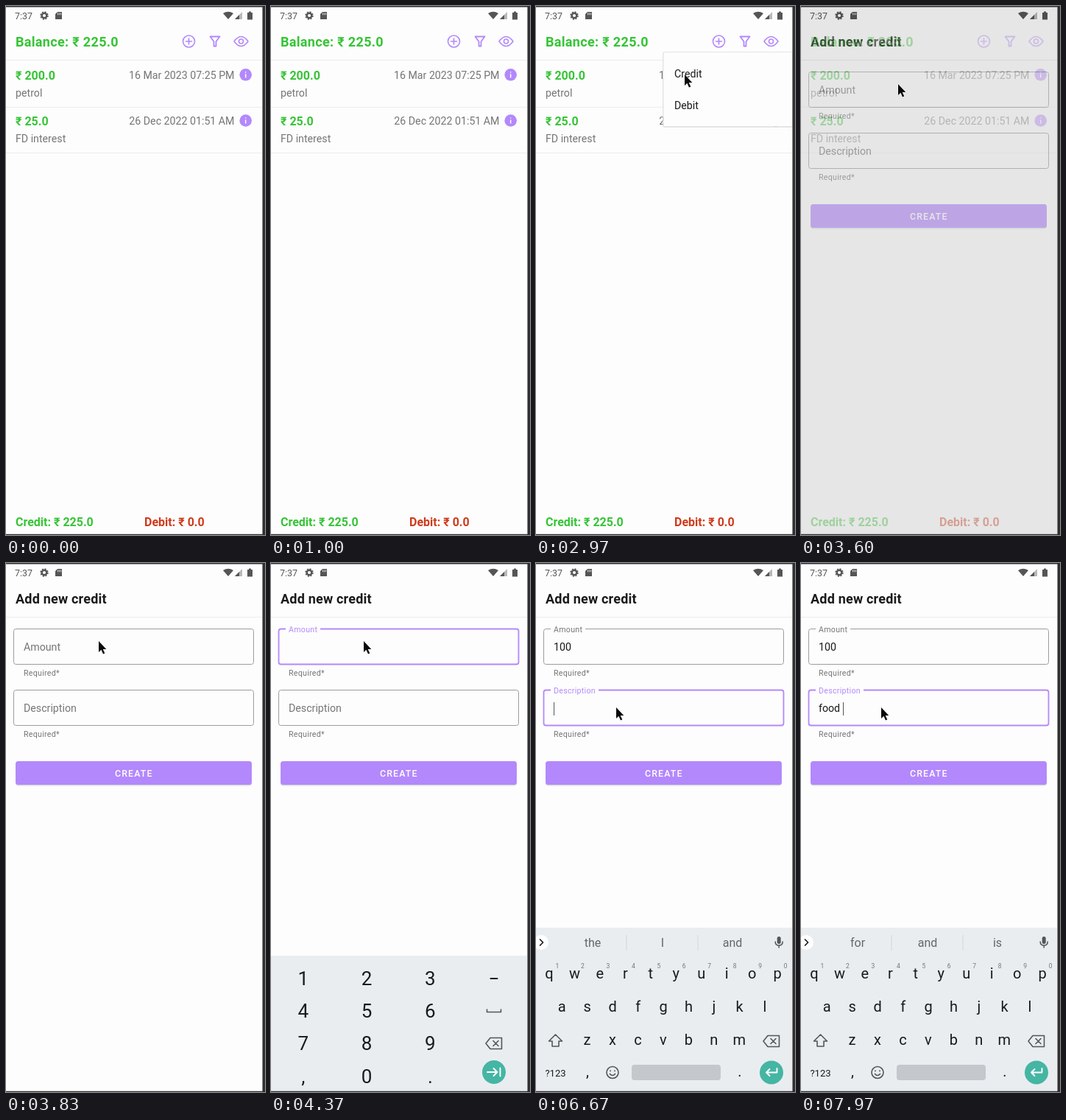
An HTML page for the animation above (8 s loop, 352 by 718 pixels).

```html
<!DOCTYPE html>
<html lang="en">
<head>
<meta charset="utf-8">
<title>Expense tracker</title>
<style>
  html, body { margin: 0; width: 100%; height: 100%; overflow: hidden; background: #fdfdfd; }
  svg { display: block; width: 352px; height: 718px; font-family: Roboto, "Noto Sans", sans-serif; }
  text { white-space: pre; }
  .line { fill: none; stroke-linecap: round; stroke-linejoin: round; }
  #tint { mix-blend-mode: multiply; }
</style>
</head>
<body>
<svg id="stage" viewBox="0 0 352 718"></svg>
<script>
const LOOP = 8000;
const PAPER = '#fdfdfd', PURPLE = '#b388fc', GREEN = '#36c436', RED = '#d03a1c',
  GREY = '#757575', INK = '#1a1a1a', KEYS = '#e9edf0', TEAL = '#45b5a4',
  ICON = '#555', FRAME = '#303030';

const text = (x, y, size, fill, str, extra = '') =>
  `<text x="${x}" y="${y}" font-size="${size}" fill="${fill}" ${extra}>${str}</text>`;
const bold = (x, y, size, fill, str, extra = '') =>
  text(x, y, size, fill, str, `font-weight="700" ${extra}`);
const mid = (x, y, size, fill, str, extra = '') =>
  text(x, y, size, fill, str, `text-anchor="middle" ${extra}`);
const rect = (x, y, w, h, fill, extra = '') =>
  `<rect x="${x}" y="${y}" width="${w}" height="${h}" fill="${fill}" ${extra}/>`;
const circle = (x, y, r, fill, extra = '') =>
  `<circle cx="${x}" cy="${y}" r="${r}" fill="${fill}" ${extra}/>`;
const line = (d, stroke, width = 1.6) =>
  `<path class="line" d="${d}" stroke="${stroke}" stroke-width="${width}"/>`;
const solid = (d, fill) => `<path d="${d}" fill="${fill}"/>`;
const group = (id, body) => `<g id="${id}">${body}</g>`;
const divider = y => rect(0, y, 348, 1, '#ececec');

const statusBar =
  text(12, 17.5, 12.4, ICON, '7:37') +
  circle(52, 13, 3.3, 'none', `stroke="${ICON}" stroke-width="2.4"`) +
  circle(52, 13, 4.9, 'none', `stroke="${ICON}" stroke-width="1.6" stroke-dasharray="2 1.85"`) +
  solid('M70 8h6v10h-9v-7z', ICON) +
  line('M70.5 9.8v2M72.5 9.8v2M74.5 9.8v2', PAPER, .8) +
  solid('M295 10q7-4.500 14 0l-7 8z', ICON) +
  solid('M311 18l10-10v10z', '#b8b8b8') + solid('M311 18l6-6v6z', ICON) +
  solid('M328 9h2v-1.500h3v1.500h2v9.500h-7z', ICON);

const entry = (y, amount, date, note) =>
  bold(13, y, 16, GREEN, amount) +
  text(310.5, y - .8, 14.2, GREY, date, 'text-anchor="end"') +
  text(13, y + 23, 14.2, GREY, note) +
  circle(325.7, y - 6.5, 8.3, PURPLE) +
  line(`M325.700 ${y - 7}v4M325.700 ${y - 10}v.1`, PAPER, 1.5) +
  divider(y + 37);

const listScreen =
  bold(13, 55.3, 18, GREEN, 'Balance: ₹ 225.0', 'letter-spacing=".32"') +
  circle(248.5, 48, 8, 'none', `stroke="${PURPLE}" stroke-width="1.6"`) +
  line('M244.500 48h8M248.500 44v8', PURPLE) +
  line('M277.500 41.500h13l-5 6.700v6.300h-3v-6.300z', PURPLE, 1.8) +
  line('M310 48q9.500-13 19 0q-9.500 13-19 0z', PURPLE) +
  circle(319.5, 48, 3, 'none', `stroke="${PURPLE}" stroke-width="1.6"`) +
  divider(73) +
  entry(99.8, '₹ 200.0', '16 Mar 2023 07:25 PM', 'petrol') +
  entry(162, '₹ 25.0', '26 Dec 2022 01:51 AM', 'FD interest') +
  bold(13, 705.8, 16, GREEN, 'Credit: ₹ 225.0') +
  bold(188, 705.8, 16, RED, 'Debit: ₹ 0.0');

const menu =
  rect(172, 62, 177, 103, '#dcdcdc', 'rx="3" opacity=".7"') +
  rect(173.5, 63, 175, 100, PAPER, 'rx="2"') +
  text(188, 97, 14.2, INK, 'Credit') +
  text(188, 140, 14.2, INK, 'Debit');

const field = (id, y, label, gap) =>
  rect(10.5, y, 326, 48, 'none', `id="${id}Box" rx="3"`) +
  rect(20, y - 2, gap, 4, PAPER, `id="${id}Gap"`) +
  text(24, y + 29, 14.2, GREY, label, `id="${id}Label"`) +
  text(24, y + 29.5, 14.2, INK, '', `id="${id}Value"`) +
  rect(0, y + 16.5, 1, 18, ICON, `id="${id}Caret"`) +
  text(24, y + 63.5, 10.6, GREY, 'Required*', 'letter-spacing=".3"');

const formScreen =
  bold(13, 55.3, 18, INK, 'Add new credit', 'letter-spacing=".2"') +
  divider(73) +
  field('amount', 89.5, 'Amount', 47) +
  field('note', 172.5, 'Description', 65) +
  rect(13, 270.5, 321, 32, '#dedede', 'rx="4"') +
  rect(13, 269, 321, 32, PURPLE, 'rx="3.5"') +
  text(148, 290.3, 12.4, '#fff', 'CREATE', 'font-weight="500" letter-spacing="1.1"');

const backspace = (x, y) => line(
  `M${x - 11} ${y}l6-7.500h15.500v15h-15.500zM${x - 1} ${y - 3.5}l7 7m0-7l-7 7`, ICON);

const numberPad =
  rect(0, 533, 348, 184, KEYS) +
  ['123', '456', '789', ',0.'].map((row, r) => [...row].map((key, c) =>
    mid(43.8 + c * 86.3, 572.6 + r * 44.4, 26, INK, key)).join('')).join('') +
  line('M298.500 564h9', INK, 2) +
  line('M293.500 606v3.500h19v-3.500', ICON) +
  backspace(303, 652) +
  circle(303, 691, 16, TEAL) +
  line('M294 691h13.500m-5-5l5 5l-5 5M311.500 685.500v11', '#fff', 1.9);

const letterRow = (keys, x, y) => [...keys].map((key, i) =>
  mid(x + i * 34.45, y, 20, INK, key)).join('');

const letterPad =
  rect(0, 495, 348, 222, KEYS) +
  circle(7, 515, 10, '#fff') + line('M5.500 511l4 4l-4 4', INK, 1.7) +
  [77, 172, 267].map((x, i) => mid(x, 521, 16, '#666', '', `id="word${i}"`)).join('') +
  rect(122.5, 505, 1, 21, '#d3d7da') + rect(219.5, 505, 1, 21, '#d3d7da') +
  rect(327.7, 507, 5, 10, ICON, 'rx="2.5"') +
  line('M325.200 514q0 5 5 5t5-5M330.200 519v3', ICON, 1.5) +
  letterRow('qwertyuiop', 18, 564) +
  [...'1234567890'].map((d, i) => mid(29 + i * 34.45, 550, 8.5, GREY, d)).join('') +
  letterRow('asdfghjkl', 35.3, 609) +
  letterRow('zxcvbnm', 69.5, 654) +
  line('M26.500 640l9 9h-4.500v7h-9v-7h-4.500z', ICON) +
  backspace(320, 649) +
  mid(26.5, 696.5, 13, INK, '?123') + mid(70, 696.5, 20, INK, ',') +
  circle(104, 691.5, 8, 'none', `stroke="${ICON}" stroke-width="1.6"`) +
  line('M101 689v.4M107 689v.4M100.500 693.500q3.500 4 7 0', ICON, 1.7) +
  rect(130, 681, 121, 21, '#c4c8cc', 'rx="4"') +
  mid(277, 696.5, 20, INK, '.') +
  circle(320, 691.5, 16, TEAL) +
  line('M327.500 686v5.500h-14.500m4.500-4.500l-4.500 4.500l4.500 4.500', '#fff', 1.9);

const pointer =
  '<path d="M0 0v15l3.400-3.200 2.600 5.800 2.300-1-2.600-5.600h4.600z" fill="#0a0a0a" ' +
  'stroke="#fff" stroke-width="1" paint-order="stroke"/>';

document.getElementById('stage').innerHTML =
  rect(0, 0, 352, 718, PAPER) +
  group('list', listScreen) +
  group('menu', menu) +
  group('form', rect(0, 24, 348, 693, PAPER) + formScreen) +
  statusBar +
  rect(0, 0, 352, 718, '#e8e8e8', 'id="tint"') +
  group('numbers', numberPad) +
  group('letters', letterPad) +
  rect(348.5, 0, 3.5, 718, FRAME) + rect(0, 0, 352, 1.5, FRAME) +
  rect(0, 716.8, 352, 1.2, FRAME) +
  group('pointer', pointer);

const ui = Object.fromEntries(
  [...document.querySelectorAll('[id]')].map(node => [node.id, node]));

const set = (node, attrs) => {
  for (const name in attrs) node.setAttribute(name, attrs[name]);
};
const show = (node, opacity) => {
  node.style.opacity = opacity;
  node.style.display = opacity > 0 ? '' : 'none';
};
const progress = (t, from, to) => Math.min(1, Math.max(0, (t - from) / (to - from)));
const smooth = p => p * p * (3 - 2 * p);
const easeOut = p => 1 - (1 - p) ** 3;
const mix = (a, b, p) => a + (b - a) * p;

// Pointer stops: time, x, y.
const stops = [[1150, -14, 150], [1750, 244, 43], [2350, 244, 43], [2850, 202, 93],
  [3300, 202, 93], [3600, 132, 106], [3800, 126, 106], [5900, 126, 106], [6250, 109, 196]];

function pointerAt(t) {
  const next = stops.findIndex(stop => stop[0] > t);
  if (next === 0) return stops[0].slice(1);
  if (next < 0) return stops[stops.length - 1].slice(1);
  const [t0, x0, y0] = stops[next - 1], [t1, x1, y1] = stops[next];
  const p = smooth(progress(t, t0, t1));
  return [mix(x0, x1, p), mix(y0, y1, p)];
}

const fields = [
  { id: 'amount', y: 89.5, focus: 3850, blur: 6350, value: '100', typed: [4600, 4800, 5000] },
  { id: 'note', y: 172.5, focus: 6350, blur: LOOP, value: 'food ',
    typed: [7000, 7200, 7400, 7600, 7800] },
];
const suggestions = ['the I and', 'for from food', 'for food of', 'foo food fool',
  'food foods good', 'for and is'].map(words => words.split(' '));

function drawField({ id, y, focus, blur, value, typed }, t) {
  const focused = t >= focus && t < blur;
  const lift = smooth(progress(t, focus, focus + 150));
  const count = typed.filter(time => time <= t).length;
  const lastInput = count ? typed[count - 1] : focus;
  const caretOn = focused && (t - lastInput) % 1000 < 500;

  set(ui[id + 'Box'], {
    stroke: focused ? PURPLE : '#9c9c9c', 'stroke-width': focused ? 1.8 : 1 });
  show(ui[id + 'Gap'], lift);
  set(ui[id + 'Label'], {
    y: mix(y + 29, y + 4.5, lift), 'font-size': mix(14.2, 10.6, lift),
    'letter-spacing': .3 * lift, fill: focused ? PURPLE : GREY });
  ui[id + 'Value'].textContent = value.slice(0, count);
  show(ui[id + 'Caret'], caretOn ? 1 : 0);
  if (caretOn) {
    set(ui[id + 'Caret'], { x: Math.round(24.2 + ui[id + 'Value'].getComputedTextLength()) });
  }
  return count;
}

function draw(t) {
  const opening = easeOut(progress(t, 2120, 2320));
  show(ui.menu, opening * (1 - progress(t, 3330, 3430)));
  set(ui.menu, { transform:
    `translate(348 62) scale(${mix(.7, 1, opening)} ${mix(.4, 1, opening)}) translate(-348 -62)` });

  show(ui.form, progress(t, 3420, 3720));
  show(ui.tint, Math.min(progress(t, 3420, 3570), 1 - progress(t, 3620, 3740)));

  const [, letters] = fields.map(f => drawField(f, t));
  const slide = easeOut(progress(t, 4000, 4280));
  show(ui.numbers, t >= 4000 && t < 6480 ? 1 : 0);
  set(ui.numbers, { transform: `translate(0 ${185 * (1 - slide)})` });
  show(ui.letters, t >= 6480 ? 1 : 0);
  suggestions[letters].forEach((word, i) => { ui['word' + i].textContent = word; });

  set(ui.pointer, { transform: `translate(${pointerAt(t).join(' ')})` });
}

const start = performance.now();
function tick() {
  draw((performance.now() - start) % LOOP);
  requestAnimationFrame(tick);
}
tick();
</script>
</body>
</html>
```
